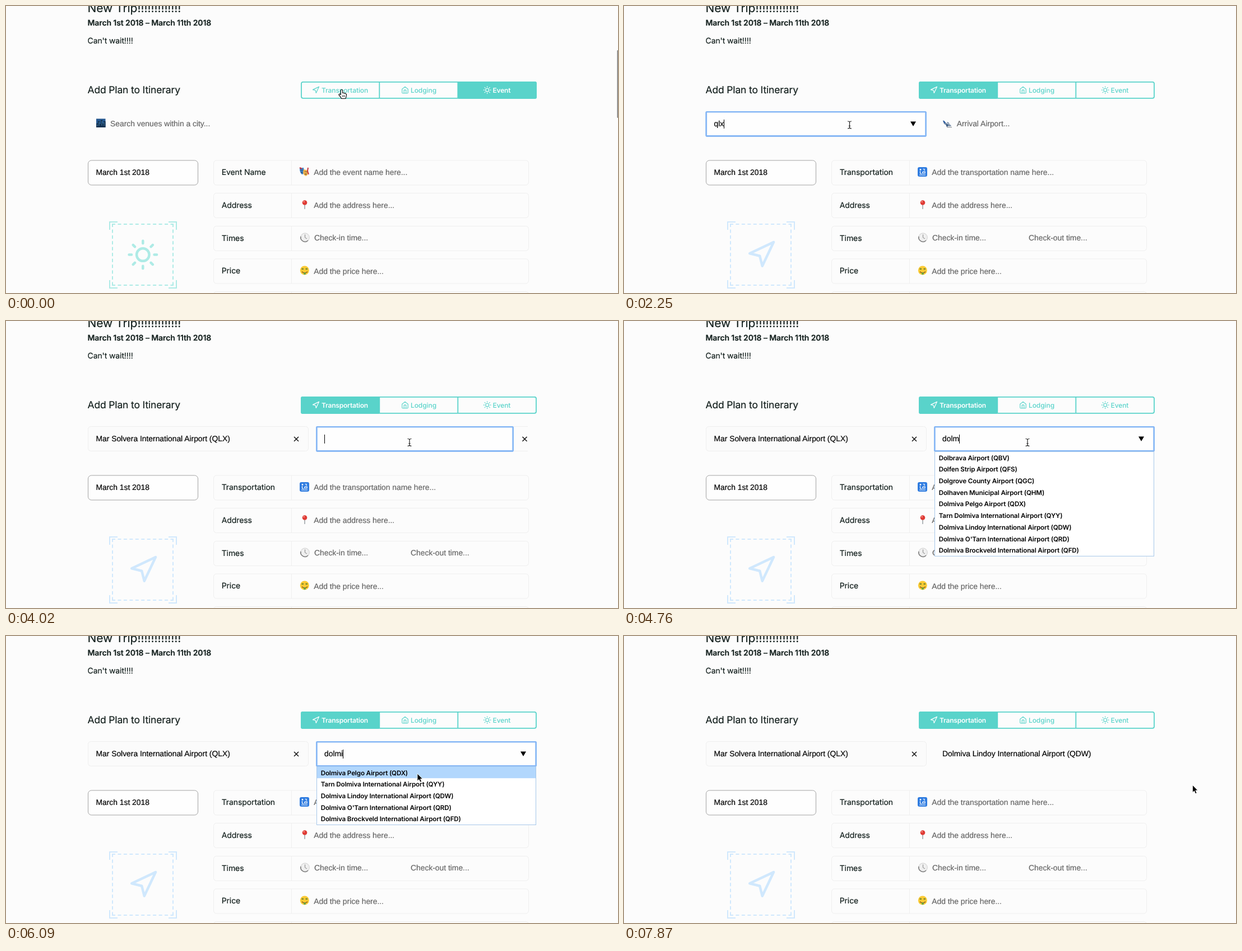
An HTML page for the animation above (8 s loop, 1092 by 513 pixels).

```html
<!DOCTYPE html>
<html lang="en">
<head>
<meta charset="utf-8">
<title>Trip planner</title>
<style>
  html, body { margin: 0; width: 100%; height: 100%; overflow: hidden; background: #fcfcfc; }
  svg { display: block; width: 100vw; height: 100vh; }
  text { font: 13.85px "Liberation Sans", Arial, sans-serif; fill: #000; stroke: #000; stroke-width: .2; text-rendering: geometricPrecision; white-space: pre; }
  .ui { font: 14px Inter, sans-serif; letter-spacing: -.1px; fill: #14201e; stroke: #14201e; }
  .title { font-size: 21px; letter-spacing: -.04px; }
  .dates { font-weight: 600; letter-spacing: -.1px; }
  .head { font-size: 17.5px; letter-spacing: -.15px; }
  .hint { fill: #666; stroke: #666; }
  .tab { font: 500 12px Inter, sans-serif; letter-spacing: -.08px; fill: currentColor; stroke: none; }
  .on .tab { font-weight: 600; letter-spacing: -.2px; }
  .tabs g { color: #59d3ca; }
  .tabs g.on { color: #fff; }
  .tabs rect { fill: none; }
  .tabs .on rect { fill: #59d3ca; }
  .icon { fill: none; stroke: currentColor; stroke-width: 2; stroke-linecap: round; stroke-linejoin: round; }
  .faint { fill: none; stroke: #efefef; }
  .ring { fill: #fefefe; stroke: #86b7f5; stroke-width: 2.6; filter: drop-shadow(0 0 .6px #8bbaf4); }
  .cross { fill: none; stroke: #111; stroke-width: 1.5; }
  .list text { font: 600 11.6px Inter, sans-serif; letter-spacing: -.13px; stroke: none; }
  .list .box { fill: #fff; stroke: #a6c7ea; }
  .list .hover { fill: #b2d7fd; }
  .frame { fill: none; stroke: currentColor; stroke-width: 2; }
</style>
</head>
<body>
<svg viewBox="0 0 1092 513">
  <defs>
    <g id="nav" class="icon"><path d="M3 11 22 2 13 21 11 13z"/></g>
    <g id="home" class="icon"><path d="M3 9l9-7 9 7v11a2 2 0 0 1-2 2H5a2 2 0 0 1-2-2zM9 22V12h6v10"/></g>
    <g id="sun" class="icon">
      <circle cx="12" cy="12" r="5"/>
      <path d="M12 1v2M12 21v2M1 12h2M21 12h2M4.22 4.22l1.42 1.42M18.36 18.36l1.42 1.42M4.22 19.78l1.42-1.42M18.36 5.64l1.42-1.42"/>
    </g>
    <path id="x" class="cross" d="M-4-4 4 4M4-4-4 4"/>
    <path id="tri" d="M-5-4H5L0 4.5z"/>
    <g id="plane">
      <path d="M1 2 4 3 6 5.5 13 8.5Q16 10 16 11.500 13 12.500 10 11.500L4 8.500Q2 7 1 2z" fill="#8195ad"/>
      <path d="M1 1.500 3.500 2.500 6 6 4 7z" fill="#2357a3"/>
      <path d="M8 5l2-.5 3.500 4zM6 8l5 1.500-2 3.500-1.500-.5z" fill="#3c5a80"/>
      <path d="M8 13.700H17" stroke="#8a8f96" stroke-width="1.200"/>
    </g>
  </defs>

  <rect width="1092" height="513" fill="#fcfcfc"/>
  <text class="ui title" x="145.5" y="11">New Trip!!!!!!!!!!!!!</text>
  <text class="ui dates" x="145.5" y="34.5">March 1st 2018 – March 11th 2018</text>
  <text class="ui" x="145.5" y="66.5">Can't wait!!!!</text>
  <text class="ui head" x="145.5" y="156">Add Plan to Itinerary</text>
  <rect id="scrollbar" x="1090.5" y="79" width="3" height="121" rx="1" fill="#7c7c7c"/>

  <g class="tabs">
    <g id="tabTrip">
      <rect x="526" y="135" width="141" height="31" rx="3"/>
      <use href="#nav" transform="translate(545.7 143.2) scale(.583)"/>
      <text class="tab" x="563" y="154.5">Transportation</text>
    </g>
    <g>
      <use href="#home" transform="translate(705 143.2) scale(.583)"/>
      <text class="tab" x="722" y="154.5">Lodging</text>
    </g>
    <g id="tabEvent">
      <rect x="806" y="135" width="141" height="31" rx="3"/>
      <use href="#sun" transform="translate(851.7 143.2) scale(.583)"/>
      <text class="tab" x="868.5" y="154.5">Event</text>
    </g>
    <path d="M529 135.800H943a3 3 0 0 1 3 3V161.800a3 3 0 0 1-3 3H530a3 3 0 0 1-3-3V138.800a3 3 0 0 1 3-3M666.300 136V165M806.300 136V165" fill="none" stroke="#59d3ca" stroke-width="1.8"/>
  </g>

  <rect x="146.5" y="276" width="196" height="44" rx="6" fill="#fefefe" stroke="#a3a3a3"/>
  <text x="160.5" y="302">March 1st 2018</text>
  <g id="badge">
    <path class="frame" d="M189 390H299M189 499H299M190 389V500M298 389V500" stroke-dasharray="6 4.45"/>
    <path class="frame" d="M185 400V386H199M290 386H304V400M304 490V504H290M199 504H185V490"/>
    <use id="bigNav" href="#nav" transform="translate(217.5 417.5) scale(2.25)"/>
    <use id="bigSun" href="#sun" transform="translate(217.3 417.6) scale(2.25)"/>
  </g>

  <g id="rows"></g>
  <text class="ui" id="nameLabel" x="384.7" y="302"></text>
  <text class="hint" id="nameHint" x="549.3" y="302"></text>
  <text class="ui" x="384.7" y="361">Address</text>
  <text class="hint" x="549.3" y="361">Add the address here...</text>
  <text class="ui" x="384.7" y="419.5">Times</text>
  <text class="hint" x="550" y="419">Check-in time...</text>
  <text class="hint" id="checkOut" x="722" y="419">Check-out time...</text>
  <text class="ui" x="384.7" y="478">Price</text>
  <text class="hint" x="549.3" y="478.5">Add the price here...</text>

  <g id="masks">
    <path d="M524 290l7-1 1 7q-1 5-4 5-4-3-4-11z" fill="#3c7fc4"/>
    <path d="M531 292l8 2q1 8-4 10-5-2-5-7z" fill="#efb24a"/>
    <path d="M539 289l-1 6 2 6M524 289l4 2" fill="none" stroke="#c8363c" stroke-width="2"/>
    <path d="M526 293.5h1.5m1.5 0h1M533 296h1.5m1 .5h1.5M533 300q2 1.5 3.5 0M526.5 298q1-1.5 2.5 0" fill="none" stroke="#2b2b3a"/>
  </g>
  <g id="customs">
    <rect x="524" y="288" width="17" height="17" rx="3" fill="#2f7ce0"/>
    <circle cx="529" cy="292.5" r="1.4" fill="#fff"/>
    <path d="M528.500 295v4l2.500 1M533.500 291.500h2.500v3M527 302h11M532.500 299h4.500v-3h-3.500z" fill="none" stroke="#fff" stroke-width="1.2"/>
  </g>
  <g>
    <path d="M533 352v11" stroke="#9aa0a6" stroke-width="1.5"/>
    <circle cx="533" cy="351.5" r="4.3" fill="#df3b35"/>
    <circle cx="531.7" cy="350" r="1.3" fill="#f59a90"/>
  </g>
  <g>
    <circle cx="533.5" cy="413.8" r="7.8" fill="#efefef" stroke="#cfcfcf"/>
    <path d="M526 412a7.700 7.700 0 0 0 13 7" fill="none" stroke="#7d7d7d" stroke-width="1.6"/>
    <path d="M533.500 408.500v5.500l3.500 2" fill="none" stroke="#888"/>
  </g>
  <g>
    <circle cx="532.8" cy="472.5" r="8" fill="#fbcb35"/>
    <path d="M527.500 470h3.500m3.500 0h3.500" stroke="#7d8b2e" stroke-width="2.4"/>
    <path d="M528 475q5 4 10 0" fill="none" stroke="#70401a" stroke-width="1.2"/>
    <path d="M531 476.500h4v3q-2 1.500-4 0z" fill="#6fa845"/>
  </g>

  <g id="venue">
    <rect x="161" y="201.5" width="16.5" height="15.5" fill="#24578f"/>
    <path d="M161 217v-7h3v-4h3v5h2v-7h3v6h2v-4h3.5v11z" fill="#12304f"/>
    <path d="M163 212v3m3-7v6m5-8v8m4-6v6" stroke="#62aee0" stroke-dasharray="1.5 1"/>
    <text class="hint" x="186" y="215">Search venues within a city...</text>
  </g>
  <g id="fromHint">
    <use href="#plane" transform="translate(160 218) scale(1 -1)"/>
    <text class="hint" x="186" y="215">Departure Airport...</text>
  </g>
  <rect id="fromBox" class="faint" x="146.5" y="188.5" width="393" height="44" rx="5" style="fill:#fbfbfb"/>
  <rect id="fromRing" class="ring" x="146.8" y="189.2" height="43.2" rx="1.5"/>
  <text id="fromText" x="160.5" y="215"></text>
  <use id="fromX" href="#x" x="518" y="211"/>
  <use id="fromTri" href="#tri" x="516" y="210.5"/>

  <path id="toEdge" class="faint" d="M635 188.5H558.5a5 5 0 0 0-5 5V220"/>
  <path id="toTail" class="faint" d="M906 188.5h25M906 232.5h25"/>
  <g id="toHint">
    <use href="#plane" x="568" y="203"/>
    <text class="hint" x="593.7" y="215">Arrival Airport...</text>
  </g>
  <rect id="toRing" class="ring" x="554.4" y="189.2" height="43.2" rx="1.5"/>
  <text id="toText" x="568" y="215"></text>
  <use id="toX" href="#x" x="925.5" y="211"/>
  <use id="toTri" href="#tri" x="923" y="210.5"/>

  <g class="list" id="list"></g>
  <path id="caret" d="M.5 203v16" stroke="#000"/>

  <g id="hand">
    <path d="M-1.7 9V1.5Q-1.5 0 0 0t1.7 1.5V6q2-.8 2.7.5 1.8-.6 2.4.8 2 0 1.7 2.5 0 3-1.7 6.200H-.5Q-2 12.500-5 9.500q-.3-2 1.500-1.700z" fill="#fff" stroke="#000" stroke-width="1.1"/>
    <path d="M1.3 10v3m2-3v3m2-3v3" stroke="#000" stroke-width=".8"/>
  </g>
  <path id="beam" d="M-3.5-6.5Q-.5-6.5 0-5 .5-6.5 3.5-6.5M0-5V5M-3.5 6.5Q-.5 6.5 0 5 .5 6.5 3.5 6.5M-1.7 2h3.4" fill="none" stroke="#222" stroke-width="1.2"/>
  <path id="arrow" d="M0 0V13.2L3 10.4 5.1 15.2 7.5 14.2 5.4 9.5H9.3z" stroke="#fff" stroke-width=".8"/>
</svg>
<script>
const LOOP = 8000, ROW = 20.7, LIST_TOP = 233.5;
const $ = id => document.getElementById(id);
const show = (id, on) => { $(id).style.display = on ? '' : 'none'; };
const within = (t, a, b) => t >= a && t < b;

const FROM = 'Mar Solvera International Airport (QLX)';
const TO = [
  'Dolmiva Pelgo Airport (QDX)',
  'Tarn Dolmiva International Airport (QYY)',
  'Dolmiva Lindoy International Airport (QDW)',
  "Dolmiva O'Tarn International Airport (QRD)",
  'Dolmiva Brockveld International Airport (QFD)'
];
const TO_WIDE = [
  'Dolbrava Airport (QBV)', 'Dolfen Strip Airport (QFS)',
  'Dolgrove County Airport (QGC)', 'Dolhaven Municipal Airport (QHM)', ...TO
];
const fromKeys = [1660, 1810, 2100];
const toKeys = [4320, 4470, 4620, 4760, 4910];

// time, shape, x, y: the pointer holds each place until the next
const pointer = [
  [0, 'hand', 599, 149.5], [590, 'arrow', 540, 176], [740, 'beam', 452, 205],
  [920, 'beam', 402.5, 212.5], [2840, 'beam', 398, 223], [2990, 'arrow', 392, 243],
  [3440, 'beam', 440, 222], [3590, 'beam', 560, 219], [3740, 'beam', 660, 216],
  [3880, 'beam', 697, 220], [4020, 'beam', 720, 217],
  [5800, 'beam', 726, 226], [5950, 'arrow', 734, 246], [6100, 'arrow', 742, 268],
  [6250, 'arrow', 750, 296], [6400, 'arrow', 755, 306], [6540, 'arrow', 757, 299],
  [6680, 'arrow', 757, 292], [7130, 'arrow', 890, 279],
  [7270, 'arrow', 1037, 265], [7870, 'arrow', 1014.5, 266.5]
];

const typed = (t, word, keys) => word.slice(0, keys.filter(k => k <= t).length);

$('rows').innerHTML = [276, 334.5, 393.5, 452, 510.5].map(y =>
  `<rect class="faint" x="370.5" y="${y}" width="562" height="44" rx="5"/>` +
  `<path class="faint" d="M509.5 ${y}v44"/>`).join('');

let listKey = '';
function drawList(names, x, hover) {
  const key = names.join() + x + hover;
  if (key === listKey) return;
  listKey = key;
  $('list').innerHTML = !names.length ? '' :
    `<rect class="box" x="${x + .5}" y="${LIST_TOP}" width="391" height="${names.length * ROW + .5}"/>` +
    (hover < 0 ? '' : `<rect class="hover" x="${x + 1}" y="${LIST_TOP + hover * ROW}" width="390" height="${ROW}"/>`) +
    names.map((n, i) => `<text x="${x + 7.7}" y="${248.6 + i * ROW}">${n}</text>`).join('');
}

function drawForm(trip) {
  $('tabTrip').setAttribute('class', trip ? 'on' : '');
  $('tabEvent').setAttribute('class', trip ? '' : 'on');
  $('badge').style.color = trip ? '#d0e8fd' : '#aeebe6';
  $('nameLabel').textContent = trip ? 'Transportation' : 'Event Name';
  $('nameHint').textContent = `Add the ${trip ? 'transportation' : 'event'} name here...`;
  for (const id of ['bigNav', 'customs', 'checkOut']) show(id, trip);
  for (const id of ['bigSun', 'masks', 'venue']) show(id, !trip);
}

function drawFields(t) {
  const fromFocus = within(t, 1220, 3290), fromTyping = within(t, 1660, 3290);
  show('fromHint', within(t, 300, 1220));
  show('fromBox', t >= 1220 && !fromTyping);
  show('fromX', t >= 1220 && !fromTyping);
  show('fromTri', fromTyping);
  show('fromRing', fromFocus);
  $('fromRing').setAttribute('width', fromTyping ? 391.7 : 350.2);
  $('fromText').textContent = t >= 3290 ? FROM : typed(t, 'qlx', fromKeys);

  const toFocus = within(t, 3880, 7870), toTyping = within(t, 4320, 7870);
  show('toHint', within(t, 300, 3880));
  show('toEdge', within(t, 740, 1660));
  show('toTail', toFocus && !toTyping);
  show('toX', toFocus && !toTyping);
  show('toTri', toTyping);
  show('toRing', toFocus);
  $('toRing').setAttribute('width', toTyping ? 391.2 : 350.2);
  $('toText').textContent = t >= 7870 ? TO[2] : typed(t, 'dolmi', toKeys);

  const blink = t < 5510 || within(t, 6010, 6510);
  show('caret', (fromFocus || toFocus) && blink);
  const text = $(fromFocus ? 'fromText' : 'toText');
  const x = Math.round((fromFocus ? 160 : 568) + text.getComputedTextLength());
  $('caret').setAttribute('transform', `translate(${x} 0)`);
}

function drawPointer(t) {
  const [, shape, x, y] = pointer.filter(p => p[0] <= t).pop();
  for (const id of ['hand', 'beam', 'arrow']) show(id, id === shape);
  $(shape).setAttribute('transform', `translate(${x} ${y})`);
  return shape === 'arrow' ? Math.floor((y - LIST_TOP) / ROW) : -1;
}

function draw(now) {
  const t = now % LOOP;
  drawForm(t >= 300);
  drawFields(t);
  show('scrollbar', t < 1810);
  const hover = drawPointer(t);
  if (within(t, 2540, 3290)) drawList([FROM], 146, hover);
  else if (within(t, 4760, 5060)) drawList(TO_WIDE, 554, -1);
  else if (within(t, 5060, 6980)) drawList(TO, 554, hover);
  else drawList([], 0, -1);
  requestAnimationFrame(draw);
}
draw(performance.now());
</script>
</body>
</html>
```
